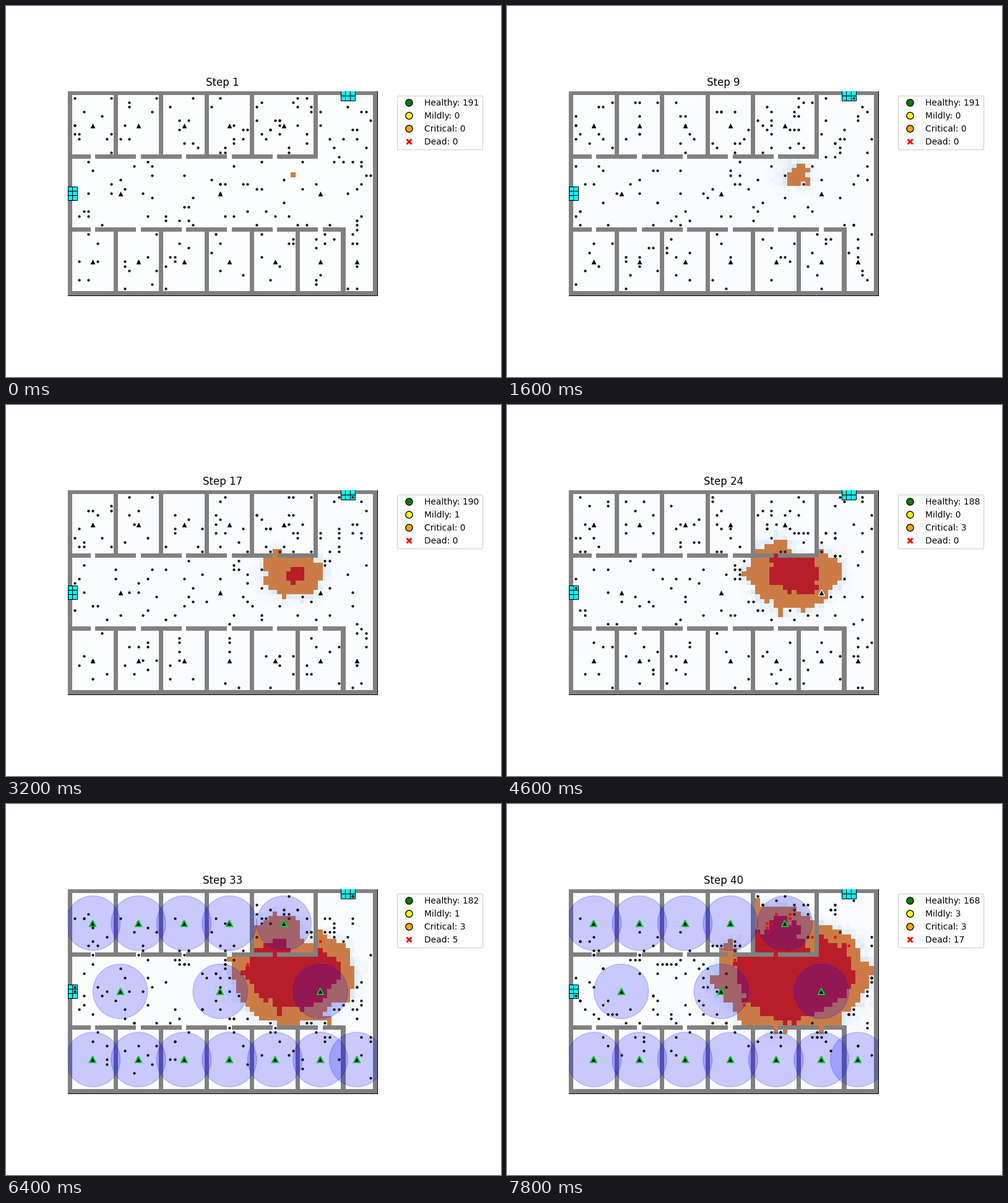
Animation, 800 px wide and 600 px high, one loop 8000 ms. Source, as a matplotlib script:

```python
import numpy as np
import matplotlib.pyplot as plt
from matplotlib.animation import FuncAnimation
from matplotlib.lines import Line2D
from matplotlib.patches import Circle

COLS, ROWS, STEPS, ALARM, PEOPLE = 68, 45, 40, 25, 191
rng = np.random.default_rng(12)

# --- floor plan: a hall between two rows of rooms --------------------------
UPPER = [0, 10, 20, 30, 40, 54, 67]
LOWER = list(range(0, 61, 10)) + [67]
UPPER_DOORS = range(5, 56, 10)
LOWER_DOORS = list(range(5, 56, 10)) + [63]

wall = np.zeros((ROWS, COLS), bool)
wall[[0, -1]] = True
wall[:, [0, -1]] = True
wall[:14, UPPER] = True
wall[30:, LOWER] = True
wall[14, :55] = True
wall[30, :61] = True
wall[14, UPPER_DOORS] = False
wall[30, LOWER_DOORS] = False
free = ~wall

EXITS = [(c, r) for c in (0, 1) for r in (21, 22, 23)]
EXITS += [(c, r) for c in (60, 61, 62) for r in (0, 1)]


def middles(edges):
    return [(a + b) // 2 for a, b in zip(edges, edges[1:])]


SPEAKERS = [(c, 7) for c in middles(UPPER)[:5]]
SPEAKERS += [(c, 22) for c in (11, 33, 55)]
SPEAKERS += [(c, 37) for c in middles(LOWER)]

# --- fire: spreads from one cell and enters each room by its door ----------
yy, xx = np.mgrid[:ROWS, :COLS]
SEED = (49, 18)
climb = np.interp(xx, [50, 56], [1, 1.4])


def reach(c, r):
    dy = yy - r
    return np.hypot(xx - c, dy * np.where(dy > 0, 1.25, climb))


hall = reach(*SEED)
arrive = np.full((ROWS, COLS), np.inf)
arrive[15:30] = hall[15:30]
for edges, doors, rows, row in ((UPPER, UPPER_DOORS, slice(1, 15), 14),
                                (LOWER, LOWER_DOORS, slice(30, 44), 30)):
    for a, b, door in zip(edges, edges[1:], doors):
        room = rows, slice(a + 1, b)
        arrive[room] = hall[row, door] + reach(door, row)[room]

noise = rng.uniform(-1, 1, (ROWS, COLS))
ragged = sum(np.roll(noise, (dx, dy), (1, 0))
             for dx in (-1, 0, 1) for dy in (-1, 0, 1)) * 0.4
arrive = np.maximum(arrive + ragged, 0.5)
arrive[wall] = np.inf
arrive[SEED[1], SEED[0]] = -0.7


def front(step):
    return 0.45 * (step - 2.5)


heat = [arrive - front(s) for s in range(1, STEPS + 1)]
burning = [h < 0 for h in heat]

FLOOR, SMOKE = np.array([252, 253, 255]), np.array([220, 233, 246])
ORANGE, RED = np.array([203, 124, 70]), np.array([183, 30, 42])


def picture(i):
    haze = np.exp(-np.maximum(heat[i], 0) / 1.3) * min(1, i / 8)
    haze = np.clip(haze * (1 + noise / 2), 0, 1)[..., None]
    img = FLOOR + (SMOKE - FLOOR) * haze
    img[burning[i]] = ORANGE
    img[arrive < front(i - 8)] = RED
    img[wall] = 128
    return img.astype(np.uint8)


# --- people ----------------------------------------------------------------
def near(p):
    spots = [(p[0] + dx, p[1] + dy) for dx in (-1, 0, 1) for dy in (-1, 0, 1)]
    return [(c, r) for c, r in spots if free[r, c]]


def exit_distance(blocked):
    dist = np.full((ROWS, COLS), np.inf)
    queue = [(c, r) for c, r in EXITS if free[r, c]]
    for c, r in queue:
        dist[r, c] = 0
    for p in queue:
        for c, r in near(p):
            if np.isinf(dist[r, c]) and not blocked[r, c]:
                dist[r, c] = dist[p[1], p[0]] + 1
                queue.append((c, r))
    return dist


way_out = exit_distance(burning[29])


def advance(p, i, flee):
    spots = near(p)
    safe = [q for q in spots if not burning[i][q[1], q[0]]]
    if not safe:
        return max(spots, key=lambda q: heat[i][q[1], q[0]])
    if flee and rng.random() < 0.5 and np.isfinite(way_out[p[1], p[0]]):
        return min(safe, key=lambda q: way_out[q[1], q[0]] + rng.random())
    return safe[rng.integers(len(safe))]


def stroll(p):
    path = [p]
    for i in range(1, STEPS):
        flee = i >= ALARM - 1
        if p and flee and way_out[p[1], p[0]] == 0:
            p = None
        if p:
            p = advance(p, i, flee)
        path.append(p)
    return path


def tally(step):
    """Running totals of hurt, at least critical, and dead."""
    keys = [15, 16, 24, 27, 33, 40]
    totals = [0, 1, 3, 3, 9, 23], [0, 0, 3, 3, 8, 20], [0, 0, 0, 2, 5, 17]
    hurt, bad, gone = [int(np.interp(step, keys, t) + 1e-6) for t in totals]
    return hurt, (bad if step > 20 else 0), gone


def caught(k):
    """Path that ends at the fire front, mostly near the upper door."""
    hit = next(i for i in range(STEPS) if tally(i + 1)[0] > k)
    edge = np.argwhere((heat[hit] < 0) & (heat[hit] > -1.2))
    odds = np.exp(-np.hypot(edge[:, 1] - 45, edge[:, 0] - 14) / 4)
    r, c = edge[rng.choice(len(edge), p=odds / odds.sum())]
    path = [(int(c), int(r))] * STEPS
    for i in range(hit - 1, -1, -1):
        path[i] = advance(path[i + 1], i, False)
    return path


victims = [caught(k) for k in range(tally(STEPS)[0])]
starts = rng.choice(np.argwhere(free & ~burning[0]), PEOPLE - len(victims))
walkers = [stroll((int(c), int(r))) for r, c in starts]

# --- drawing ---------------------------------------------------------------
fig, ax = plt.subplots(figsize=(8, 6), dpi=100)
fig.subplots_adjust(left=0.125, right=0.75, bottom=0.11, top=0.88)
image = ax.imshow(picture(0), extent=(0, COLS, ROWS, 0),
                  interpolation="nearest", zorder=2.6)
ax.set(xticks=[], yticks=[], xlim=(0, COLS), ylim=(ROWS, 0))
title = ax.set_title("Step 1")


def dots(marker="o", size=2, face="green", edge="black", width=1, z=4):
    return ax.plot([], [], marker, ms=size, mfc=face, mec=edge, mew=width,
                   zorder=z)[0]


def place(artist, points):
    pts = np.array([p for p in points if p], float).reshape(-1, 2) + 0.5
    artist.set_data(pts[:, 0], pts[:, 1])


place(dots("s", 5.5, "cyan", "black", 0.8, 2.7), EXITS)
rings = [ax.add_patch(Circle((c + 0.5, r + 0.5), 6, color="blue", alpha=0.2,
                             zorder=2.8, visible=False))
         for c, r in SPEAKERS]
speakers = dots("^", 7, "black", "white", 1, 3)
place(speakers, SPEAKERS)
healthy, mild = dots(), dots(face="yellow")
critical = dots(face="orange")
dead = dots("X", 3, "red", "red", 0.5)

LABELS = ["Healthy", "Mildly", "Critical", "Dead"]
keys = [Line2D([], [], color="w", marker="o", ms=8, mfc=c, mec="black")
        for c in ("green", "yellow", "orange")]
keys.append(Line2D([], [], color="w", marker="X", ms=8, mfc="red"))
legend = ax.legend(keys, [f"{name}: {PEOPLE}" for name in LABELS],
                   loc="upper left", bbox_to_anchor=(1.05, 1))


def draw(i):
    step = i + 1
    hurt, bad, gone = tally(step)
    image.set_data(picture(i))
    title.set_text(f"Step {step}")

    spots = [v[i] for v in victims]
    place(healthy, [w[i] for w in walkers] + spots[hurt:])
    place(mild, spots[bad:hurt])
    place(critical, spots[gone:bad])
    place(dead, spots[:gone])

    counts = (PEOPLE - hurt, hurt - bad, bad - gone, gone)
    for text, name, n in zip(legend.get_texts(), LABELS, counts):
        text.set_text(f"{name}: {n}")

    alarm = step >= ALARM
    for ring in rings:
        ring.set_visible(alarm)
    speakers.set_markeredgecolor("#00c832" if alarm else "white")
    speakers.set_markeredgewidth(1.5 if alarm else 1)
    return []


anim = FuncAnimation(fig, draw, frames=STEPS, interval=200, repeat=True,
                     repeat_delay=0)
plt.show()
```
